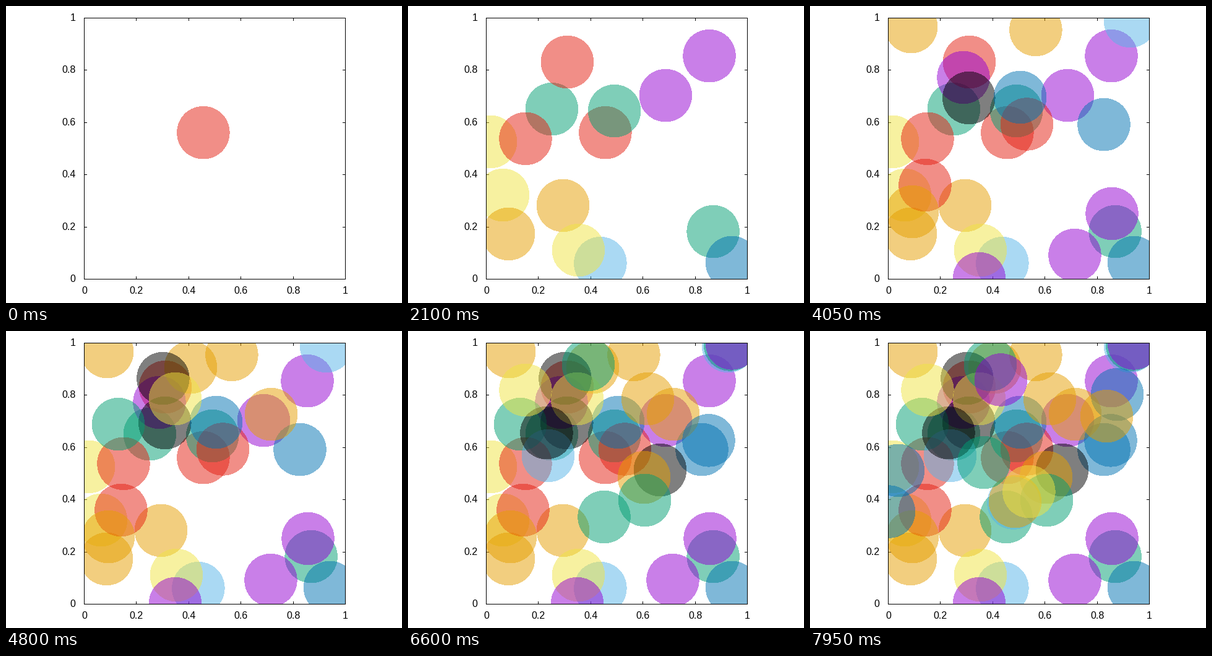
These frames come from a looping animation (640x480 px, 8000 ms). A matplotlib script:

```python
import matplotlib.pyplot as plt
from matplotlib.animation import FuncAnimation
from matplotlib.patches import Circle, Rectangle

DPI = 100
LEFT, TOP, SIDE = 126, 19, 422
RIGHT, BOTTOM = LEFT + SIDE, TOP + SIDE
RADIUS = 0.1
TICK = 5
INTERVAL, FRAMES, HOLD = 50, 160, 3

COLORS = {
    "purple": "#9400d3", "green": "#009e73", "sky": "#56b4e9",
    "orange": "#e69f00", "yellow": "#f0e442", "blue": "#0072b2",
    "red": "#e51e10", "black": "#000000",
}

# Discs in order of appearance: colour and centre in the unit square.
DISCS = [
    ("red", .457, .560), ("purple", .688, .7025), ("green", .252, .650),
    ("yellow", .065, .321), ("purple", .8555, .854), ("green", .870, .181),
    ("yellow", .018, .525), ("orange", .0865, .172), ("sky", .438, .060),
    ("red", .3115, .8305), ("orange", .295, .281), ("yellow", .354, .110),
    ("red", .1515, .537), ("blue", .942, .063), ("green", .492, .643),
    ("purple", .289, .7715), ("red", .532, .5925), ("black", .310, .693),
    ("red", .142, .359), ("orange", .566, .954), ("sky", .928, .987),
    ("orange", .089, .9655), ("blue", .506, .6955), ("purple", .858, .250),
    ("orange", .0935, .257), ("blue", .827, .591), ("purple", .7155, .091),
    ("purple", .3495, .001), ("orange", .4087, .906), ("black", .303, .8635),
    ("green", .1315, .688), ("orange", .717, .726), ("yellow", .3495, .7855),
    ("black", .667, .513), ("blue", .853, .626), ("green", .4526, .333),
    ("orange", .6055, .4845), ("green", .392, .916), ("sky", .238, .5675),
    ("green", .935, .993), ("black", .232, .655), ("orange", .620, .7855),
    ("purple", .942, .998), ("yellow", .1515, .8187), ("green", .608, .397),
    ("sky", .481, .386), ("blue", .039, .5107), ("orange", .487, .392),
    ("green", .367, .5415), ("blue", .0036, .353), ("yellow", .540, .430),
    ("blue", .878, .802), ("purple", .4325, .858), ("orange", .8377, .719),
]


def bar(x, y, width, height, zorder=1):
    """Fill whole pixels, with (x, y) the top left one."""
    ax.add_patch(Rectangle((x, y), width, height, facecolor="black",
                           linewidth=0, antialiased=False, zorder=zorder))


def draw_ticks():
    font = dict(family="Liberation Sans", size=16 * 72 / DPI, va="baseline")
    for k in range(6):
        offset = round(SIDE * k / 5)
        x, y = LEFT + offset, BOTTOM - offset
        bar(LEFT, y, TICK, 1)
        bar(RIGHT + 1 - TICK, y, TICK, 1)
        bar(x, TOP, 1, TICK)
        bar(x, BOTTOM + 1 - TICK, 1, TICK)
        label = f"{k / 5:g}"
        ax.text(x + 0.5, BOTTOM + 24, label, ha="center", **font)
        ax.text(LEFT - 13.5, y + 5, label, ha="right", **font)


def draw_border():
    for x in (LEFT, RIGHT):
        bar(x, TOP, 1, SIDE + 1, zorder=4)
    for y in (TOP, BOTTOM):
        bar(LEFT, y, SIDE + 1, 1, zorder=4)


def make_disc(color, x, y, order):
    centre = LEFT + SIDE * x, BOTTOM - SIDE * y
    disc = Circle(centre, RADIUS * SIDE, facecolor=COLORS[color],
                  alpha=0.5, linewidth=0, antialiased=False,
                  zorder=2 + order / 100)
    ax.add_patch(disc)
    disc.set_clip_path(Rectangle((LEFT + 1, TOP + 1), SIDE - 1, SIDE - 1,
                                 transform=ax.transData))
    return disc


def update(frame):
    shown = frame // HOLD + 1
    for order, disc in enumerate(discs):
        disc.set_visible(order < shown)
    return discs


fig = plt.figure(figsize=(640 / DPI, 480 / DPI), dpi=DPI, facecolor="white")
ax = fig.add_axes([0, 0, 1, 1])
ax.set_xlim(0, 640)
ax.set_ylim(480, 0)
ax.axis("off")
draw_ticks()
draw_border()
discs = [make_disc(*spec, order) for order, spec in enumerate(DISCS)]

anim = FuncAnimation(fig, update, frames=FRAMES, interval=INTERVAL,
                     repeat=True, repeat_delay=0, blit=False)
plt.show()
```
